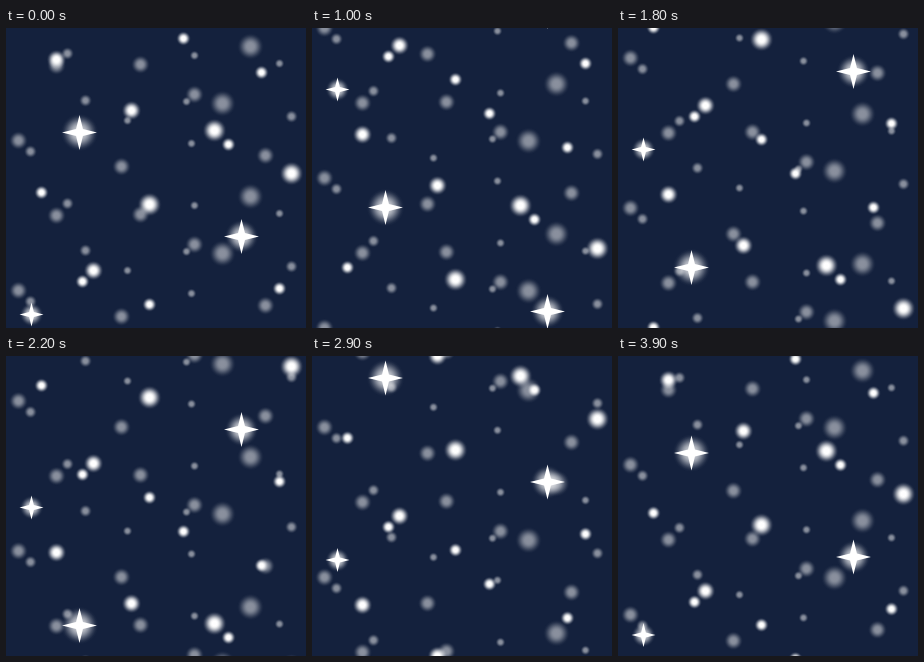
Write an HTML page with a canvas that moves like this. It is 300 by 300 pixels and loops after 4000 ms.

```html
<!DOCTYPE html>
<html lang="en">
<head>
<meta charset="utf-8">
<title>Falling snow</title>
<style>
  html, body { margin: 0; height: 100%; overflow: hidden; background: #14213d; }
  canvas { display: block; }
</style>
</head>
<body>
<canvas id="sky" width="300" height="300"></canvas>
<script>
const SIZE = 300, LOOP = 4000, STEP = 100;
const ctx = document.getElementById('sky').getContext('2d');
ctx.translate(0.5, 0.5); // points name pixel centres

// Flake centres grouped by radius; each layer repeats vertically every `tile`.
const layers = [
  { tile: SIZE / 2, alpha: 0.5, flakes: {
    5.2: '188,27 273,35 180,73 121,92 185,115',
    6.8: '61,25 79,72 285,88 24,123',
    9.7: '134,36 50,37 188,66 12,112 259,127 115,138',
    13.6: '244,18 216,75'
  } },
  { tile: SIZE, alpha: 1, flakes: {
    7.5: '177,10 255,44 222,116 35,164 76,253 273,260 143,276',
    10.2: '50,31 125,82 87,242',
    12.4: '208,102 285,145 143,176'
  } }
];
const stars = [
  { x: 73, y: 104, r: 17.5, glow: 19 },
  { x: 235, y: 208, r: 17.5, glow: 17 },
  { x: 25, y: 286, r: 12, glow: 12 }
];

// Soft disc: solid core, then a cosine falloff to the rim.
function dot(x, y, r, alpha) {
  const gradient = ctx.createRadialGradient(x, y, 0, x, y, r);
  for (let t = 0; t <= 10; t++) {
    const fade = Math.max(0, (t / 10 - 0.18) / 0.82);
    const a = alpha * (1 + Math.cos(Math.PI * fade)) / 2;
    gradient.addColorStop(t / 10, `rgba(255,255,255,${a})`);
  }
  ctx.fillStyle = gradient;
  ctx.fillRect(x - r, y - r, 2 * r, 2 * r);
}

function star(x, y, r, glow) {
  dot(x, y, glow, 0.75);
  ctx.fillStyle = '#fff';
  ctx.beginPath();
  for (let i = 0; i < 8; i++) {
    const reach = i % 2 ? r * 0.28 : r, angle = i * Math.PI / 4;
    ctx.lineTo(x + reach * Math.cos(angle), y + reach * Math.sin(angle));
  }
  ctx.fill();
}

// Falls one tile per loop, drawing every visible repeat.
function fall(y, r, tile, progress, draw) {
  for (let top = (y + tile * progress) % tile - tile; top < SIZE + r; top += tile)
    draw(top);
}

function render(time) {
  const progress = Math.floor(time % LOOP / STEP) * STEP / LOOP;
  ctx.clearRect(-1, -1, SIZE + 2, SIZE + 2);
  for (const { tile, alpha, flakes } of layers)
    for (const [radius, points] of Object.entries(flakes))
      for (const point of points.split(' ')) {
        const [x, y] = point.split(',').map(Number);
        fall(y, +radius, tile, progress, top => dot(x, top, +radius, alpha));
      }
  for (const { x, y, r, glow } of stars)
    fall(y, glow, SIZE, progress, top => star(x, top, r, glow));
}

const start = performance.now();
function tick() {
  render(performance.now() - start);
  requestAnimationFrame(tick);
}
tick();
</script>
</body>
</html>
```
